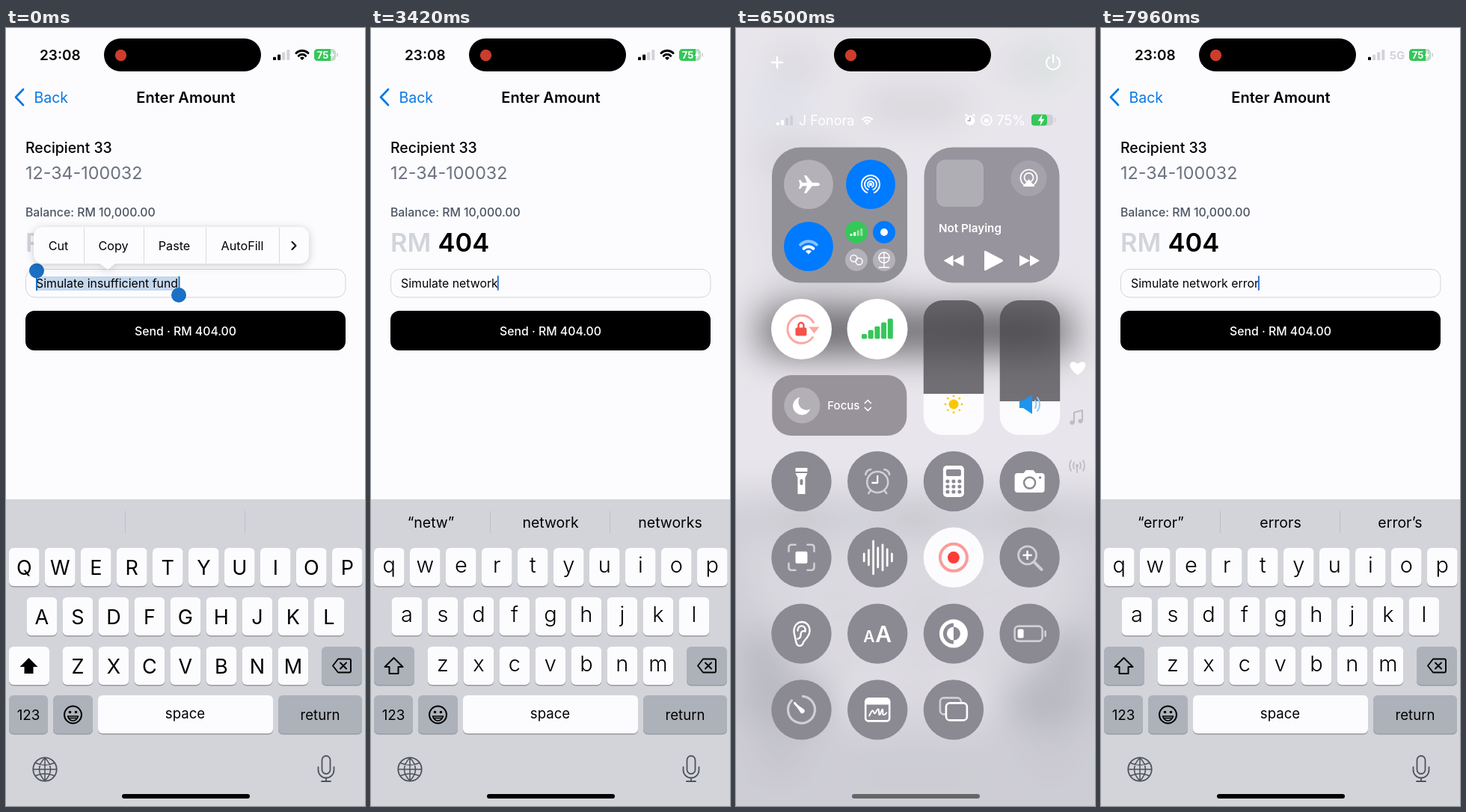
Animation of 480x1040 px, one loop 8000 ms. Source, as an HTML page:

```html
<!DOCTYPE html>
<html lang="en">
<head>
<meta charset="utf-8">
<title>Enter Amount</title>
<style>
html, body { margin: 0; width: 100%; height: 100%; overflow: hidden; background: #fcfcfe; }
svg { display: block; width: 100vw; height: 100vh; }
text { font-family: Inter, "Noto Sans", sans-serif; white-space: pre; }
</style>
</head>
<body>
<svg id="stage" viewBox="0 0 480 1040" xmlns="http://www.w3.org/2000/svg"></svg>
<script>
const LOOP = 8000, OPEN = 5960, TAP = 6950, CLOSE = 7250;
const BG = '#fcfcfe', KEYBOARD = '#d2d4da', GREY = '#adb1ba', LINE = '#d2d4da', INK = '#50535a';
const BLUE = '#007aff', GREEN = '#34c759', RED = '#ff3b36';
const PAD = '#8b8992', PALE = '#b4b2b8', SOFT = '#d0ced6';

// Markup helpers
const txt = (x, y, s, size, fill = '#000', more = '') =>
  `<text x="${x}" y="${y}" font-size="${size}" fill="${fill}" ${more}>${s}</text>`;
const mid = (x, y, s, size, fill, more = '') => txt(x, y, s, size, fill, 'text-anchor="middle" ' + more);
const rect = (x, y, w, h, r, fill, more = '') =>
  `<rect x="${x}" y="${y}" width="${w}" height="${h}" rx="${r}" fill="${fill}" ${more}/>`;
const dot = (x, y, r, fill = '#fff') => `<circle cx="${x}" cy="${y}" r="${r}" fill="${fill}"/>`;
const ring = (x, y, r, w = 2, c = '#fff') =>
  `<circle cx="${x}" cy="${y}" r="${r}" fill="none" stroke="${c}" stroke-width="${w}"/>`;
const line = (d, w = 2, c = '#fff') =>
  `<path d="${d}" fill="none" stroke="${c}" stroke-width="${w}" stroke-linecap="round" stroke-linejoin="round"/>`;
const shape = (d, c = '#fff') => `<path d="${d}" fill="${c}"/>`;
const at = (x, y, s, k = 1) => `<g transform="translate(${x} ${y}) scale(${k})">${s}</g>`;
const group = (id, s) => `<g id="${id}">${s}</g>`;

const wifi = (c, outer = c) => line('M-8 -2.5A11.5 11.5 0 0 1 8 -2.5', 3, outer) +
  line('M-4.7 1.3A6.7 6.7 0 0 1 4.7 1.3', 3, c) + shape('M0 7L-3 4A4.4 4.4 0 0 1 3 4Z', c);
const bars = (n, step, w, h, on, off) => Array.from({ length: n }, (_, i) => {
  const tall = h * (i + 1.3) / (n + .3);
  return rect(i * step, -tall, w, tall, w * .25, Array.isArray(on) ? on[i] : i < on ? '#000' : off);
}).join('');
const bolt = c => shape('M1.5 -7L-4 1.2H-.4L-1.5 7L4 -1.2H.4Z', c);

// Phone screen
const key = (x, y, w, fill = BG) => rect(x, y + 1.5, w, 51, 6, '#999ba1') + rect(x, y, w, 51, 6, fill);
const ROWS = [['qwertyuiop', 4, 695], ['asdfghjkl', 27.6, 761], ['zxcvbnm', 75.6, 827]];
const eachKey = fn => ROWS.map(([row, x, y]) => [...row].map((c, i) => fn(c, x + 48 * i, y)).join('')).join('');
const arrow = 'M0 -11L12 1H6V10H-6V1H-12Z';

const keyboard = rect(-100, 630, 680, 600, 0, KEYBOARD) +
  line('M159.5 646V675M319.5 646V675', 1, '#bcbec5') +
  eachKey((c, x, y) => key(x, y, 40.6)) +
  group('upper', eachKey((c, x, y) => mid(x + 20.3, y + 36, c.toUpperCase(), 27)) +
    key(4, 827, 54) + at(30.5, 853, shape(arrow, '#000'))) +
  group('lower', eachKey((c, x, y) => mid(x + 20.3, y + 33, c, 29, '#000', 'font-weight="300"')) +
    key(4, 827, 54, GREY) + at(30.5, 853, line(arrow, 2, '#000'))) +
  key(422, 827, 54, GREY) + at(449, 852.5,
    line('M-12 0L-5 -9H10Q12 -9 12 -7V7Q12 9 10 9H-5ZM-2 -4L6 4M6 -4L-2 4', 1.9, '#000')) +
  key(4, 892, 52, GREY) + mid(30, 925, '123', 18.8) +
  key(63, 892, 53, GREY) + at(89.5, 918, ring(0, 0, 11.5, 2, '#000') + dot(-4, -3.5, 1.8, '#000') +
    dot(4, -3.5, 1.8, '#000') + line('M-7 2H7Q5 8 0 8Q-5 8 -7 2ZM-5.5 4.5H5.5', 1.6, '#000')) +
  key(123, 892, 234) + mid(239.5, 923, 'space', 18.6) +
  key(364, 892, 112, GREY) + mid(420, 924.5, 'return', 18.6) +
  at(52, 991, ring(0, 0, 15.7, 1.8, INK) +
    line('M-15.5 0H15.5M0 -15.5V15.5M-12.5 -8.5Q0 -3 12.5 -8.5M-12.5 8.5Q0 3 12.5 8.5M0 -15.5Q-15 0 0 15.5Q15 0 0 -15.5', 1.5, INK)) +
  at(428, 990, rect(-5.5, -17, 11, 24, 5.5, 'none', `stroke="${INK}" stroke-width="1.8"`) +
    line('M-10.5 -2V2A10.5 10.5 0 0 0 10.5 2V-2M0 12.5V17M-6 17H6', 1.8, INK)) +
  [80, 240, 400].map((x, i) => mid(x, 668, '', 19.5, '#000', `id="hint${i}"`)).join('') +
  rect(160, 990, 162, 70, 14, GREY, 'id="dock"');

const menu = `<g filter="url(#shadow)">${rect(37, 266, 368, 49, 12, BG)}${shape('M124 314H147L136 323Z', BG)}</g>` +
  line('M104.5 267V314M184.5 267V314M267.5 267V314M365.5 267V314', 1, '#d9dade') +
  mid(70, 297, 'Cut', 16.2) + mid(143.5, 297, 'Copy', 16.2) + mid(225, 297, 'Paste', 16.2) +
  mid(316, 297, 'AutoFill', 16.2) + line('M382.5 286L387.5 291L382.5 296', 2, '#000');

const HANDLE = '#1a70c4';
const app = rect(-100, -100, 680, 1240, 0, BG) +
  txt(45, 43, '23:08', 19, '#000', 'font-weight="600"') +
  group('wifiOn', at(357, 43, bars(4, 6.1, 4, 14, 2, LINE)) + at(396, 36, wifi('#000'))) +
  group('wifiOff', at(357, 43, bars(4, 6.1, 4, 14, 1, LINE)) + mid(396, 42, '5G', 15, LINE, 'font-weight="700"')) +
  rect(412, 28, 29, 16, 5, '#bfdcc8') + shape('M417 28H434V44H417Q412 44 412 39V33Q412 28 417 28Z', GREEN) +
  rect(442.3, 33.5, 1.6, 5, .8, '#c6cfca') + mid(423.5, 41, '75', 13, '#fff', 'font-weight="700"') +
  at(436, 36, bolt('#fff'), .8) +
  line('M23 82L13 92.5L23 103', 2.7, '#0879e2') + txt(37.5, 99.5, 'Back', 19.5, '#0879e2') +
  mid(240.5, 99.5, 'Enter Amount', 20, '#000', 'font-weight="600"') +
  txt(26, 166.5, 'Recipient 33', 19.4, '#000', 'font-weight="500"') +
  txt(26, 202, '12-34-100032', 23.3, '#6b7280') +
  txt(26, 251.5, 'Balance: RM 10,000.00', 15.8, '#4b5563', 'font-weight="500"') +
  txt(26, 299, 'RM', 34.5, '#d1d5db', 'font-weight="600"') +
  txt(89.5, 299, '404', 34.5, '#000', 'font-weight="600"') +
  rect(26.5, 322.5, 427.5, 37.5, 12, BG, `stroke="${LINE}"`) +
  rect(40, 332, 191, 19, 0, '#c6d8ec', 'id="highlight"') +
  txt(40, 347, '', 15.85, '#000', 'id="field"') + rect(0, 331, 2, 20, 1, '#3274d0', 'id="caret"') +
  group('handles', rect(40, 325, 2, 26, 0, HANDLE) + rect(230.5, 332, 2, 26, 0, HANDLE) +
    dot(41, 324.5, 10, HANDLE) + dot(231, 357, 10, HANDLE)) +
  group('menu', menu) +
  rect(26, 378, 428, 53, 12, '#000') +
  mid(240, 410.5, 'Send · RM 404.00', 15.8, '#fff', 'font-weight="500"') + keyboard;

// Control panel modules
const fanRings = ring(0, 0, 12, 2) + ring(0, 0, 8, 2) + ring(0, 0, 4, 2) + shape('M0 0L-5 14H5Z', BLUE) + dot(0, 0, 2.2);
const plane = shape('M15 0Q15 -2 11 -2.3H5L-3 -12H-6L-2 -2.3H-8L-11 -6H-13L-11.5 0L-13 6H-11L-8 2.3H-2L-6 12H-3L5 2.3H11Q15 2 15 0Z');
const skip = shape('M-14 0L-1 -7.5V7.5ZM-1 0L13 -7.5V7.5Z');

const connect = rect(-90.5, -90.5, 181, 181, 38, '#919097') +
  dot(-41.5, -41, 33, PALE) + at(-41.5, -41, plane) +
  dot(41.5, -41, 33, BLUE) + at(41.5, -41, fanRings) +
  '<circle id="wifiDisc" cx="-41.5" cy="42" r="33"/>' +
  group('wifiBlue', at(-41.5, 43, wifi('#fff', '#8cc2ff'), 1.35)) + group('wifiGrey', at(-41.5, 43, wifi('#807e86'), 1.3)) +
  dot(22.5, 23, 15, GREEN) + at(14, 28, bars(4, 4.6, 3, 10, ['#fff', '#fff', '#9ee0a0', '#9ee0a0'])) +
  dot(59.5, 23, 15, BLUE) + dot(59.5, 23, 5) +
  dot(22.5, 60, 15, PALE) + ring(19, 58, 4.5, 1.5) + ring(26, 62, 4.5, 1.5) +
  dot(59.5, 60, 15, PALE) + ring(59.5, 57, 7, 1.5) + line('M52.5 57H66.5M59.5 50V70M53 70H66', 1.4);

const media = rect(-90.5, -90.5, 181, 181, 38, '#97949d') + rect(-74, -74, 63, 63, 12, '#b0aeb5') +
  dot(49.5, -49, 24, '#a5a2ab') + at(49.5, -49, line('M-5.5 9A11 11 0 1 1 5.5 9M-3 4A6 6 0 1 1 3 4', 1.8) + shape('M0 1L8 11H-8Z')) +
  txt(-71, 23, 'Not Playing', 15.2, '#fff', 'font-weight="600"') +
  at(-50.5, 61, skip) + at(1, 61, shape('M-11 -12Q-11 -14 -9 -13L13 -1.5Q15 0 13 1.5L-9 13Q-11 14 -11 12Z')) + at(50, 61, skip, '-1 1');

const lock = dot(0, 0, 40.5) + line('M16 -9A18.5 18.5 0 1 0 15 11', 3, '#fba8a2') + shape('M10 -3H24L17 6Z', '#fba8a2') +
  rect(-8, -2, 15, 11, 2, '#f5524c') + line('M-4 -2V-5A3.5 3.5 0 0 1 3 -5V-2', 2.4, '#f5524c');
const cell = dot(0, 0, 40.5) + at(-21, 13, bars(5, 8.7, 7, 27, Array(5).fill(GREEN)));
const focus = rect(-90, -40.5, 180, 81, 26, '#98939a') + dot(-50, 0, 24, '#b2afb5') +
  shape('M-53 -11A12 12 0 1 0 -39 5A11 11 0 0 1 -53 -11Z') + txt(-16, 5.5, 'Focus', 15, '#fff', 'font-weight="500"') +
  line('M34 -3L38 -7L42 -3M34 3L38 7L42 3', 1.7);
const slider = (level, icon) => `<g clip-path="url(#pill)">${rect(-40.5, -90, 81, 90 + level, 0, '#4a474c', 'fill-opacity=".74"')}` +
  `${rect(-40.5, level, 81, 120, 0, BG)}</g>` + icon;
const rays = Array.from({ length: 8 }, (_, i) => dot(11 * Math.cos(i * Math.PI / 4), 49 + 11 * Math.sin(i * Math.PI / 4), 1.4, '#f9c800')).join('');
const sun = dot(0, 49, 6.5, '#f9c800') + rays;
const speaker = at(0, 49, shape('M-14 -5H-9L3 -13V13L-9 5H-14Z', '#1c95ee') + line('M7 -5Q10 0 7 5M10 -9Q16 0 10 9', 2, '#8fc9f2'));

const pads = Array.from({ length: 9 }, (_, i) => dot(-8 + i % 3 * 8, Math.floor(i / 3) * 7, 2.5, PAD)).join('');
const wave = [5, 10, 22, 13, 17, 11, 5].map((h, i) => `M${-18 + i * 6.2} ${-h}V${h}`).join('');
const tools = [
  shape('M-8 -18H8V-13H-8ZM-8 -11H8L5 -5V17H-5V-5Z') + rect(-2, -3, 4, 8, 2, PAD),
  ring(0, 1, 14, 2.6, SOFT) + line('M-9 -16Q-15 -15 -16 -9M9 -16Q15 -15 16 -9M-9 12L-12 16M9 12L12 16', 2.6, SOFT) + line('M0 -7V2H-7', 2.3),
  rect(-14, -21, 28, 42, 5, '#fff') + rect(-10, -16, 20, 9, 2, PAD) + pads,
  shape('M-16 -11H-8L-5 -15H5L8 -11H16Q20 -11 20 -7V11Q20 15 16 15H-16Q-20 15 -20 11V-7Q-20 -11 -16 -11Z') + ring(0, 2, 7.5, 2.5, PAD) + dot(14, -5, 1.8, PAD),
  line('M-17 -8V-13Q-17 -17 -13 -17H-8M8 -17H13Q17 -17 17 -13V-8M17 8V13Q17 17 13 17H8M-8 17H-13Q-17 17 -17 13V8', 2.6, SOFT) + rect(-8, -8, 16, 16, 2, '#fff'),
  line(wave, 2.8),
  ring(0, 0, 18, 4, '#fc9c98') + dot(0, 0, 8, RED),
  ring(-3, -3, 12, 2.8, SOFT) + line('M6 6L16 16', 4, SOFT) + line('M-8 -3H2M-3 -8V2', 2.5),
  line('M-10 -2C-11 -20 12 -20 11 -3C10 6 3 8 2 13C0 18 -6 17 -7 12ZM-5 -4C-5 -13 7 -12 5 -3Q-1 -5 -1 2Q-1 6 -5 7', 2.4),
  txt(-19, 11, 'A', 21, '#fff', 'font-weight="600"') + txt(-3, 11, 'A', 30, '#fff', 'font-weight="600"'),
  ring(0, 0, 16.5, 5) + shape('M0 -9A9 9 0 0 0 0 9Z') + shape('M0 -16A16 16 0 0 1 0 16V9A9 9 0 0 0 0 -9Z'),
  rect(-20, -10, 37, 20, 5, 'none', `stroke="${SOFT}" stroke-width="2.6"`) + rect(-16, -6, 8, 12, 2, '#fff') + line('M21 -3V3', 2.6, SOFT),
  line('M2 -18A18 18 0 1 1 -13 -12.5', 3.2, SOFT) + shape('M-10 -10L3 -1A3 3 0 0 1 -1 4Z') + line('M-9 -9L0 1', 3),
  rect(-16, -15, 32, 30, 4, 'none', 'stroke="#fff" stroke-width="2.6"') + rect(-16, -15, 32, 8, 2, '#fff') +
    line('M-11 8C-3 -10 -7 14 -1 1C4 -7 0 12 4 5Q8 -7 7 6Q9 8 12 4', 2),
  rect(-18, -16, 28, 22, 5, 'none', `stroke="${SOFT}" stroke-width="2.6"`) + rect(-10, -9, 28, 23, 5, PAD, 'stroke="#fff" stroke-width="2.6"')
];
const modules = [
  [138.5, 250, connect], [342, 250, media], [87.5, 402.5, lock], [189, 402.5, cell],
  [291, 454, slider(35, sun)], [393, 454, slider(45, speaker)], [138.3, 504.5, focus],
  ...tools.map((icon, i) => [87.5 + 101.7 * (i % 4), 606 + 101.8 * Math.floor(i / 4),
    dot(0, 0, 40.2, i === 6 ? BG : PAD) + icon])
];
// Loose icons: x, y, fade-out start, markup
const DIM = '#bfbcc4';
const extras = [
  [55, 46, 7250, line('M-7 0H7M0 -7V7', 2.5)],
  [424, 46, 7250, line('M-5 -7A9 9 0 1 0 5 -7M0 -10V0', 2)],
  [457, 455, 7250, shape('M0 9C-18 -3 -9 -14 0 -6C9 -14 18 -3 0 9Z')],
  [456, 521, 7420, line('M-4 6V-7L7 -10V4', 2.2, DIM) + dot(-6.5, 6.5, 3, DIM) + dot(4.5, 4.5, 3, DIM)],
  [456, 585, 7420, line('M0 0V9M-4 -4Q-6 0 -4 4M4 -4Q6 0 4 4M-8 -7Q-12 0 -8 7M8 -7Q12 0 8 7', 1.8, DIM) + dot(0, 0, 2, DIM)]
];
const panelLeft = at(54, 130, bars(4, 6, 4, 13, ['#fff', '#fff', SOFT, SOFT])) +
  txt(84, 129.5, 'J Fonora', 18, '#fff') + at(175.5, 124, wifi('#fff'), .8);
const panelRight = dot(313, 123.5, 6.5) + line('M307 117L309 116M319 117L317 116', 2) + line('M313 120V124H310', 1.4, '#a3a1aa') +
  ring(335, 123, 6.8, 1.7) + rect(332, 121.5, 6, 5, 1, '#fff') + txt(348.5, 129.5, '75%', 18, '#fff') +
  rect(395, 115.5, 29, 15, 5, SOFT) + rect(395, 115.5, 21, 15, 4, GREEN) + at(408, 123, bolt('#fff'), 1.1) +
  rect(425.5, 120, 1.6, 6, .8, SOFT);

const stage = document.getElementById('stage');
stage.innerHTML = `<defs>
  <filter id="blur" filterUnits="userSpaceOnUse" x="-90" y="-90" width="660" height="1220" color-interpolation-filters="sRGB">
    <feGaussianBlur id="soft" stdDeviation="0"/></filter>
  <filter id="shadow" x="-10%" y="-60%" width="120%" height="220%" color-interpolation-filters="sRGB">
    <feDropShadow dx="0" dy="2" stdDeviation="6" flood-color="#000" flood-opacity=".2"/></filter>
  <clipPath id="pill"><rect x="-40.5" y="-90" width="81" height="180" rx="26"/></clipPath></defs>` +
  group('app', app) + rect(0, 0, 480, 1040, 0, '#c6c2cb', 'id="tint"') +
  group('panel', group('panelLeft', panelLeft) + group('panelRight', panelRight) +
    modules.map((m, i) => group('mod' + i, m[2])).join('') +
    extras.map((e, i) => group('extra' + i, at(e[0], e[1], e[3]))).join('') +
    mid(240.5, 121, 'Disconnecting Nearby Wi-Fi Until Tomorrow', 16.5, '#fff', 'id="notice"')) +
  rect(131, 14, 210, 44, 22, '#000') + dot(153.5, 36.5, 7.7, '#cc3d2c') +
  rect(155, 1024, 171, 6, 3, '#000', 'id="home"');

const ids = {};
stage.querySelectorAll('[id]').forEach(e => ids[e.id] = e);
const set = (id, name, v) => ids[id].setAttribute(name, v);
const fade = (id, v) => set(id, 'opacity', v);
const show = (id, on) => set(id, 'display', on ? 'inline' : 'none');
const ramp = (t, start, len) => Math.min(1, Math.max(0, (t - start) / len));

// Typing: two steady bursts with a pause after the first word
const PHRASE = 'Simulate network error';
const strokeAt = i => i < 9 ? 830 + 146 * i : 2440 + 147 * (i - 9);
const typed = t => [...PHRASE].filter((_, i) => strokeAt(i) <= t).length;

// Suggestions, each from the given number of typed letters
const HINTS = [
  [0, '', '', ''], [2, '“Si”', 'Since', 'Six'], [4, '“Simu”', 'Simulate', 'Simulated'],
  [9, 'the', 'a', 'your'], [10, 'th', 'n', 'norm'], [11, '“ne”', 'new', 'next'],
  [13, '“netw”', 'network', 'networks'], [17, 'error', 'and', 'is'],
  [19, '“er”', 'error', 'errors'], [21, '“erro”', 'error', 'errors'],
  [22, '“error”', 'errors', 'error’s']
];

// Aligns two words into letters that stay (0), leave (-1) or arrive (1)
const memo = new Map();
function align(a, b) {
  const id = a + '|' + b;
  if (memo.has(id)) return memo.get(id);
  const kept = list => list.filter(l => !l[1]).length;
  let out;
  if (!a || !b) out = [...a].map(c => [c, -1]).concat([...b].map(c => [c, 1]));
  else if (a[0] === b[0]) out = [[a[0], 0], ...align(a.slice(1), b.slice(1))];
  else {
    const drop = [[a[0], -1], ...align(a.slice(1), b)];
    const add = [[b[0], 1], ...align(a, b.slice(1))];
    out = kept(add) > kept(drop) ? add : drop;
  }
  memo.set(id, out);
  return out;
}

function drawHints(t) {
  const count = typed(t - 16);
  const n = HINTS.filter(h => h[0] <= count).length - 1;
  const now = HINTS[n], old = HINTS[Math.max(0, n - 1)];
  const p = n ? ramp(t, strokeAt(now[0] - 1) + 16, 230) : 1;
  for (let i = 0; i < 3; i++) {
    ids['hint' + i].innerHTML = align(old[i + 1], now[i + 1]).map(([c, kind]) => {
      const v = kind ? (kind > 0 ? p : 1 - p) : 1;
      return v ? `<tspan font-size="${19.5 * v}" fill-opacity="${v}">${c}</tspan>` : '';
    }).join('');
  }
}

function caretOpacity(t) {
  if (t < 5300) return 1 - ramp(t, 4720, 160) + ramp(t, 4900, 140);
  return 1 - ramp(t, 5540, 170) + ramp(t, OPEN, 170);
}

function drawField(t) {
  const n = typed(t);
  ids.field.textContent = n ? PHRASE.slice(0, n) : 'Simulate insufficient fund';
  const end = ids.field.getComputedTextLength();
  set('highlight', 'width', end);
  set('caret', 'x', 39 + end);
  fade('caret', n ? caretOpacity(t) : 0);
  for (const id of ['highlight', 'handles', 'upper']) show(id, !n);
  show('lower', n);
  fade('menu', 1 - ramp(t, 790, 200));
}

function pose(x, y, t) {
  if (t < CLOSE) {
    const q = (1 - ramp(t, OPEN, 540)) ** 2;
    const wait = y < 300 ? 145 : y < 500 ? 215 : 250 + (y - 500) * .1;
    return [240 + (x - 240) * (1 - .29 * q), 250 - 43 * q + (y - 250) * (1 - .34 * q), 1 - .75 * q, ramp(t, OPEN + wait, 230)];
  }
  const c = Math.min(2, ((t - CLOSE) / 250) ** 1.5), e = 1 - Math.exp((250 - y) / 250);
  const grow = -.083 + .11 * e + (x > 250 && y < 300 ? .028 : 0);
  const row = (y - 250) / 100;
  const wait = 5.5 * row * row + .07 * (x - 87) * row;
  return [x, y - (57 - 17 * e) * c, 1 + grow * c, 1 - ramp(t, 7350 + wait, 250)];
}

function drawPanel(t) {
  const closing = t >= CLOSE, on = t >= OPEN && t < 7940;
  const b = closing ? 1 - ramp(t, CLOSE, 500) : ramp(t, OPEN, 550);
  show('panel', on);
  fade('tint', .38 * b ** (closing ? 2.6 : 1.4));
  if (b) set('app', 'filter', 'url(#blur)'); else ids.app.removeAttribute('filter');
  set('soft', 'stdDeviation', 28 * b ** (closing ? 1.2 : .7));
  const k = 1 - .035 * Math.min(1, 2.2 * b);
  set('app', 'transform', `translate(${240 * (1 - k)} ${415 * (1 - k)}) scale(${k})`);
  fade('dock', 3 * b * (1 - b));
  fade('home', t < OPEN ? 1 : t < 6250 ? 1 - ramp(t, OPEN, 150) : .5 * ramp(t, 6250, 200) + .5 * ramp(t, CLOSE, 200));
  show('wifiOn', t < TAP);
  show('wifiOff', t >= TAP);
  if (!on) return;
  modules.forEach(([x, y], i) => {
    const [px, py, s, o] = pose(x, y, t);
    set('mod' + i, 'transform', `translate(${px} ${py}) scale(${s})`);
    fade('mod' + i, o);
  });
  extras.forEach(([, y, out], i) =>
    fade('extra' + i, ramp(t, OPEN + (y < 100 ? 50 : 220), 220) * (1 - ramp(t, out, 220))));
  const q = (1 - ramp(t, OPEN, 540)) ** 2, bar = ramp(t, 6080, 220) * (1 - ramp(t, TAP, 200));
  set('panelLeft', 'transform', `translate(${105 * q} ${-107 * q})`);
  set('panelRight', 'transform', `translate(${40 * q} ${-107 * q})`);
  fade('panelLeft', bar);
  fade('panelRight', bar);
  const c = closing ? (t - CLOSE) / 250 : 0;
  set('notice', 'transform', `translate(0 ${8 - 8 * c})`);
  fade('notice', ramp(t, TAP + 100, 200) * (1 - ramp(t, 7380, 300)));
  set('wifiDisc', 'fill', t < TAP ? BLUE : BG);
  show('wifiBlue', t < TAP);
  show('wifiGrey', t >= TAP);
}

function draw(t) {
  drawField(t);
  drawHints(t);
  drawPanel(t);
}

const start = performance.now();
function tick() {
  draw((performance.now() - start) % LOOP);
  requestAnimationFrame(tick);
}
tick();
</script>
</body>
</html>
```
